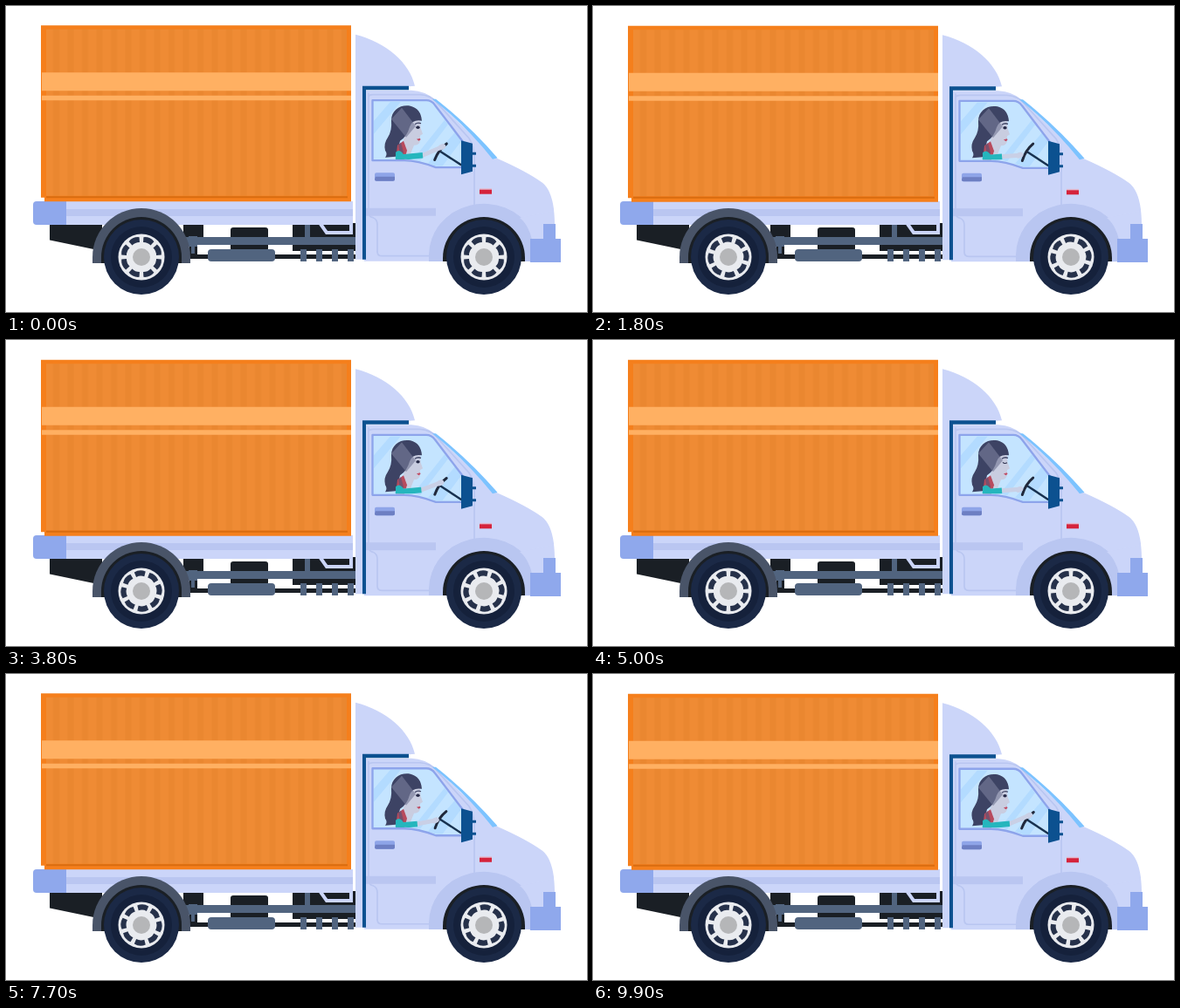
Recreate the animation shown at these times as an HTML page. Size 665 by 351 pixels, loop 10000 ms.

```html
<!DOCTYPE html>
<html lang="en">
<head>
<meta charset="utf-8">
<title>Delivery truck</title>
<style>
  html, body { margin: 0; width: 100%; height: 100%; overflow: hidden; background: #fff; }
  svg { display: block; width: 100vw; height: 100vh; }
</style>
</head>
<body>
<svg viewBox="0 0 665 351" fill="none">
  <defs>
    <pattern id="ribs" x="46" width="16.5" height="10" patternUnits="userSpaceOnUse">
      <path fill="#ef8b34" d="M0 0H17V10H0z"/>
      <path fill="#ea8730" d="M8 0h7v10H8z"/>
    </pattern>
    <clipPath id="pane"><path d="M421 110H480Q486 110 490 115L522 156V184H493Q472 176 456 176H421z"/></clipPath>
    <g id="tire">
      <circle r="43" fill="#1b2946"/>
      <circle r="35" fill="#15213b"/>
      <circle r="26.5" fill="#e9ebef"/>
    </g>
    <path id="hole" fill="#26314a" d="M-6.500-22Q0-25.500 6.500-22L4.600-16.500Q0-18.500-4.600-16.500z"/>
  </defs>

  <!-- undercarriage -->
  <g fill="#1a1f25">
    <path d="M50 250H110V281L50 268.500z"/>
    <path d="M203 250H226V266H203z"/>
    <path d="M210 266H219V290H210z"/>
    <path d="M328 249H400V281H328z"/>
    <path d="M210 285H400V290H210z"/>
    <rect x="257" y="254" width="43" height="27" rx="3"/>
  </g>
  <g fill="#51647f">
    <path d="M206 265H400V274H206zM342 251h6v23h-6z"/>
    <path d="M209 264h10v12h-10zM212 276h4v8h-4z"/>
    <rect x="231" y="279" width="77" height="14" rx="4"/>
    <path d="M337 279h7v14h-7zM355 279h7v14h-7zM373 279h7v14h-7zM391 279h7v14h-7z"/>
  </g>
  <path d="M360 250L367 260H395V250" stroke="#cbd5f9" stroke-width="4"/>

  <!-- bed -->
  <path fill="#cbd5f9" d="M66 224H397V251H66z"/>
  <path fill="#bac6f1" d="M66 233H397V241H66z"/>
  <path fill="#8fa8ec" d="M69 224V251H35Q31 251 31 247V228Q31 224 35 224z"/>

  <g id="box">
    <path fill="#f57f1c" d="M40 22.500H395V224.500H44V220H40z"/>
    <path fill="url(#ribs)" d="M46 27H390V218H46z"/>
    <path stroke="#d96c10" stroke-width="2" d="M46 219.500H391"/>
    <path fill="#ffb062" d="M41 76.500H395V97.500H41zM41 103H395V108.500H41z"/>
  </g>

  <g id="cab">
    <path fill="#cbd5f9" d="M400 33C435 42 462 65 468 92L412 96V291H400z"/>
    <path fill="#cbd5f9" d="M410 97H464Q480 98 490 107L562 175Q596 190 614 203Q624 211 627 233L629 270L620 293H410z"/>
    <path fill="#bac6f1" d="M412 232H492V241H412z"/>
    <path fill="#0c5190" d="M408 92H461V96.500H412V291H408z"/>
    <g stroke="#b9c6f1" stroke-width="1.700">
      <path d="M415 100V237Q415 242 420 243Q425 245 425 251V282Q425 287 430 287H484"/>
      <path d="M415 104Q416 102 420 102H474Q486 103 492 110L530 152Q536 161 536 175V238"/>
    </g>
    <path fill="#7cc3ff" d="M488 107H492Q530 137 562.500 174.500L557 176Q526 137 488 107z"/>

    <path fill="#c4e4ff" d="M419.500 108.500H481Q487 108.500 491 114L523 156V185.500H492Q471 177.500 456 177.500H419.500z"/>
    <g clip-path="url(#pane)">
      <path fill="#b3dbff" d="M421 132L440 110H452L421 147zM480 184L514 145 522 154 498 186zM466 176L502 131 506 136 474 178z"/>
      <g id="driver">
        <path fill="#c9cde0" d="M461 130L474 130 474.500 140 477 147 474 149 474 155Q473 160 467 160L463 170H452L456 149z"/>
        <path fill="#3d4364" d="M441 132C441 119 452 113 463 115Q475 118 476 132Q465 130 462 139Q459 150 451 155Q449 165 446 173L434 174Q437 170 434 166Q432 158 437 151Q442 143 441 132z"/>
        <path fill="#777b98" opacity=".65" d="M441 130L453 117 469 138 458 151z"/>
        <path stroke="#3d4364" stroke-width="1.300" d="M468 136Q471 133.500 475 135"/>
        <ellipse id="open" cx="471.500" cy="139.500" rx="2.200" ry="1.800" fill="#272b48"/>
        <path id="shut" d="M469 140Q471 142 474 140.500" stroke="#272b48" stroke-width="1.100"/>
        <path fill="#c04a62" d="M470 153l4-1 .5 1.500-2 1.500z"/>
        <path fill="#b84b5d" d="M448 160L455 155 459 166 456 177H446z"/>
        <path fill="#78506c" d="M449 160l3-3 3 11-3 8z"/>
        <path fill="#25b6bd" d="M446 168Q450 164 454 169L456 177H446z"/>
      </g>
      <path stroke="#17314f" stroke-width="2.400" d="M497 167L523 184"/>
      <path id="steer" stroke="#20293c" stroke-width="3" stroke-linecap="round" d="M491 177Q495 165 504 158"/>
      <path id="arm" stroke="#c9d0e6" stroke-width="5" stroke-linecap="round" stroke-linejoin="round"/>
      <path id="sleeve" stroke="#25b6bd" stroke-width="6.500"/>
      <ellipse id="hand" fill="#c9d0e6" rx="4.500" ry="3.200"/>
    </g>
    <path stroke="#8da4eb" stroke-width="2.300" stroke-linejoin="round" d="M419.500 108.500H481Q487 108.500 491 114L523 156V185.500H492Q471 177.500 456 177.500H419.500z"/>
    <path fill="#0c5190" d="M521 154.500L534 158V190L521 193.500zM534 168h4v3h-4zM534 182h4v3h-4z"/>
    <rect x="422" y="191.500" width="23" height="9.500" rx="2" fill="#8ea4e8"/>
    <path fill="#6d7fc3" d="M423 196H445V199Q445 201 443 201H424Q422 201 422 199z"/>
    <path fill="#e3b9cd" d="M542 209.500h14v2h-14z"/>
    <path fill="#d5233c" d="M542 211h14v5h-14z"/>
  </g>

  <!-- wheel arches and front bumper -->
  <path fill="#b9c6f1" d="M484 293V286A63 59 0 0 1 602 257L602 293z"/>
  <path fill="#cbd5f9" d="M588 243Q598 251 602 268H629L627 235z"/>
  <path fill="#1a1f25" d="M500 293V289A47 47 0 0 1 594 289V293z"/>
  <path fill="#8fa8ec" d="M600 267H615V250H629V267H635V294H600z"/>
  <path fill="#495468" d="M99 295V288A56 56 0 0 1 211 288V295z"/>
  <path fill="#1a1f25" d="M109 295V288A46 46 0 0 1 201 288V295z"/>

  <g id="wheels"></g>
</svg>
<script>
  const $ = id => document.getElementById(id);
  const set = (id, name, value) => $(id).setAttribute(name, value);
  const TAU = 2 * Math.PI, LOOP = 10000, STEP = 100;

  const holes = Array.from({ length: 8 }, (_, i) =>
    `<use href="#hole" transform="rotate(${i * 45 + 22.5})"/>`).join("");
  $("wheels").innerHTML = [155, 547].map(x => `
    <g transform="translate(${x} 288)">
      <use href="#tire"/>
      <g class="rim">${holes}</g>
      <circle r="10" fill="#b5b6b8"/>
    </g>`).join("");
  const rims = document.querySelectorAll(".rim");

  function draw(ms) {
    const s = Math.floor(ms % LOOP / STEP) * STEP / 1000;

    // engine shake
    const shake = -0.4 * Math.cos(TAU * s / 0.4 - 0.7);
    for (const id of ["box", "cab"]) set(id, "transform", `translate(0 ${shake})`);
    rims.forEach(rim => rim.setAttribute("transform", `rotate(${s * 360})`));

    // hand slides along the steering wheel
    const lift = 0.5 + 0.5 * Math.cos(TAU * s * 0.3);
    const x = 488 + 11 * lift, y = 171 - 9 * lift;
    const cuffX = 468 + 9 * lift, cuffY = 172.5 - lift;
    set("arm", "d", `M455 173L${cuffX} ${cuffY}L${x} ${y}`);
    set("sleeve", "d", `M446 172.500L456 173.500L${cuffX} ${cuffY}`);
    set("hand", "transform", `translate(${x} ${y}) rotate(-25)`);
    set("steer", "transform", `rotate(${4 * lift - 2} 497 167)`);

    const blink = Math.abs(s - 5) < 0.15;
    set("open", "opacity", blink ? 0 : 1);
    set("shut", "opacity", blink ? 1 : 0);
  }

  const start = performance.now();
  (function tick() {
    draw(performance.now() - start);
    requestAnimationFrame(tick);
  })();
</script>
</body>
</html>
```
